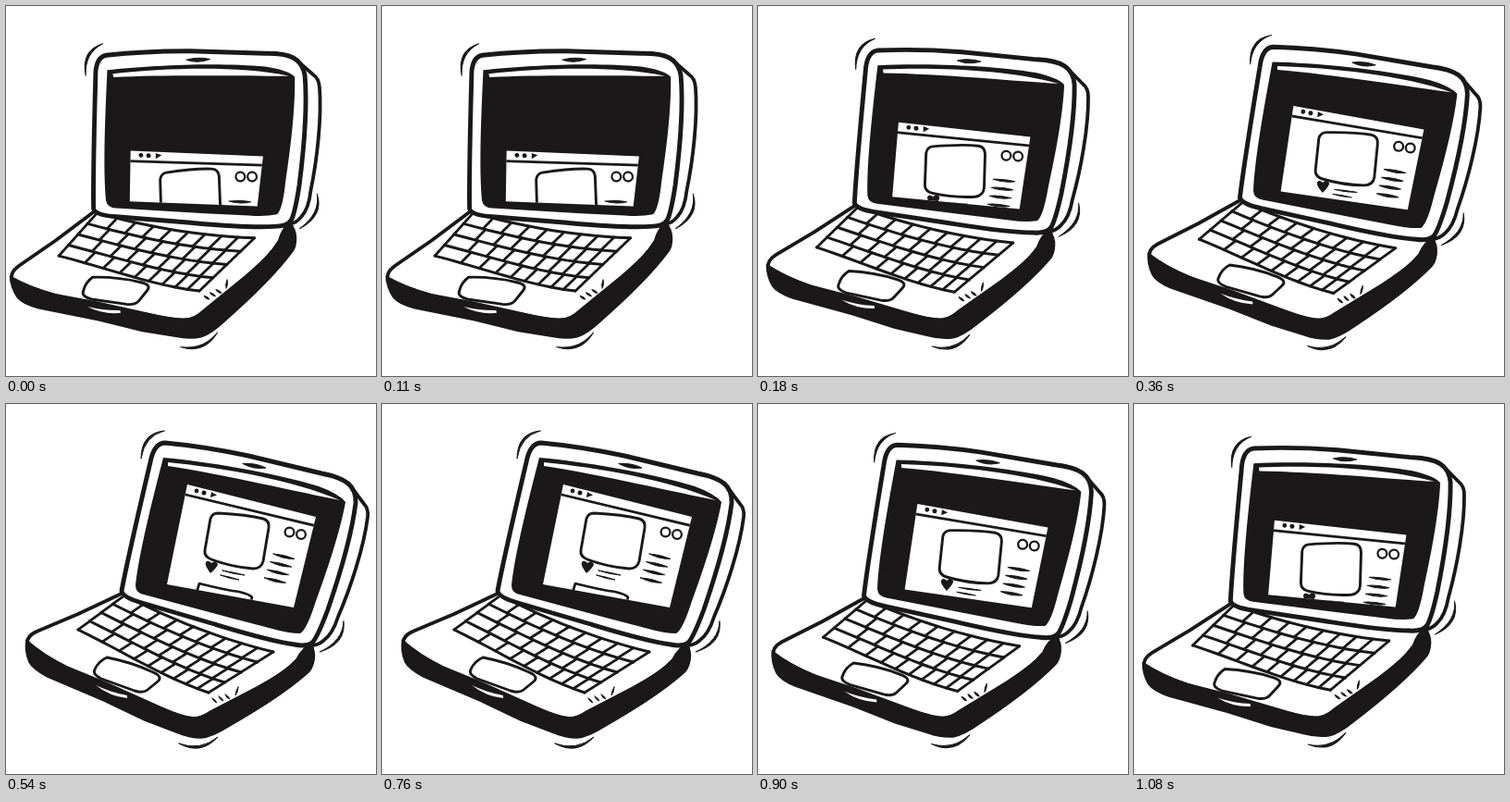
Recreate the animation shown at these times as an HTML page with a canvas. Size 400 by 400 pixels, loop 1.26 s.

```html
<!DOCTYPE html>
<html lang="en">
<head>
<meta charset="utf-8">
<title>Laptop</title>
<style>
html, body { margin: 0; width: 100%; height: 100%; overflow: hidden; background: #fff; }
canvas { display: block; width: 400px; height: 400px; }
</style>
</head>
<body>
<canvas id="stage" width="400" height="400"></canvas>
<script>
const ctx = document.getElementById('stage').getContext('2d');
const INK = '#1a1819', PAPER = '#fff';
const STEP = 180;
const ORDER = [0, 1, 2, 3, 3, 2, 1];
const TILT = 11.7 * Math.PI / 180;
const PIVOT = [195, 359];

// Per pose: page offset inside the screen, and how far its lower edge drops.
const POSES = [
  { dx: -19, dy: 61.5, drop: 1 },
  { dx: -12, dy: 35, drop: 0.85 },
  { dx: -6.5, dy: 20, drop: 0.5 },
  { dx: 0, dy: 0, drop: 0 }
];

const shape = d => new Path2D(d);
const LID = shape('M125 202C132 165 145 110 156 63Q160 42 172 42Q215 46 262 56L341 75C367 80 379 88 378 107C374 140 359 190 348 222Q338 249 332 257Q326 263 312 260C284 256 252 246 222 237L147 215Q126 209 125 202Z');
const LID_BACK = shape('M341 75C361 78 370 86 378 96L387 108Q392 113 391 122C387 155 372 200 359 230Q353 249 343 256Q337 261 330 261');
const SCREEN = shape('M170 58C215 62 290 74 338 89Q360 97 367 106C361 140 345 186 334 216Q325 244 318 248Q305 248 288 243L242 231L149 206Q140 204 140 196C144 160 158 105 170 58Z');
const GLARE = shape('M175 63C235 69 310 82 361 104C320 96 235 76 175 67Z');
const DECK = shape('M127 204L78 227L33 246Q22 251 23 260Q60 286 110 304Q160 328 190 338Q205 344 220 334L272 307Q315 283 331 264Z');
const FRONT = shape('M22 255Q40 271 66 284L110 302L168 328Q190 338 203 339Q212 339 224 331L272 306Q300 291 314 276Q320 264 329 260Q335 266 333 277Q331 287 326 291C300 314 270 332 240 349Q222 360 211 361Q198 361 184 355L150 342L106 321L45 295Q29 287 25 279Q20 267 22 255Z');
const NOTCH = shape('M97 304Q114 312 131 315L131 318Q112 316 97 304Z');
const PAD = shape('M109 274Q136 279 159 290Q170 295 164 300L153 309Q148 313 139 310L103 297Q93 292 96 287Q100 278 109 274Z');
const PICTURE = shape('M229 118C248 119 266 121 278 124Q285 126 284 134L278 170Q276 178 267 178Q243 176 222 168Q214 165 215 158L221 124Q223 118 229 118Z');
const HEART = shape('M221 183C217 177 215 174 216 171Q219 168 222 172Q226 168 229 173Q229 176 221 183Z');
const TAB = shape('M206 204L209 194Q236 201 252 203Q264 206 266 209L264 216');

function fill(path, color = INK) {
  ctx.fillStyle = color;
  ctx.fill(path);
}

function stroke(path, width) {
  ctx.lineWidth = width;
  ctx.stroke(path);
}

function line(x1, y1, x2, y2, width) {
  ctx.lineWidth = width;
  ctx.beginPath();
  ctx.moveTo(x1, y1);
  ctx.lineTo(x2, y2);
  ctx.stroke();
}

function dot(x, y, r) {
  ctx.beginPath();
  ctx.arc(x, y, r, 0, 7);
}

// Brush mark that is thick in the middle and pointed at both ends.
function brush(x1, y1, cx, cy, x2, y2, width) {
  const len = Math.hypot(x2 - x1, y2 - y1);
  const nx = -(y2 - y1) / len * width, ny = (x2 - x1) / len * width;
  ctx.fillStyle = INK;
  ctx.lineWidth = 1;
  ctx.beginPath();
  ctx.moveTo(x1, y1);
  ctx.quadraticCurveTo(cx + nx, cy + ny, x2, y2);
  ctx.quadraticCurveTo(cx - nx, cy - ny, x1, y1);
  ctx.fill();
  ctx.stroke();
}

function dash(x, y, w, h, width) {
  brush(x, y, x + w / 2, y + h / 2 + 0.5, x + w, y + h, width);
}

// Point on the keyboard, u across and v towards the user.
function key(u, v) {
  const mix = (a, b, c, d) => (a + (b - a) * u) * (1 - v) + (d + (c - d) * u) * v;
  const sag = u * (1 - u) * (22 * (1 - v) + 22 * u * v);
  return [mix(128, 289, 219, 78), mix(207, 268, 312, 244) + sag];
}

function keyLine(u1, v1, u2, v2, width) {
  ctx.lineWidth = width;
  ctx.beginPath();
  for (let i = 0; i <= 12; i++) {
    const t = i / 12;
    ctx.lineTo(...key(u1 + (u2 - u1) * t, v1 + (v2 - v1) * t));
  }
  ctx.stroke();
}

function keyboard() {
  const rows = 4, cols = 9;
  for (let r = 0; r <= rows; r++) keyLine(0, r / rows, 1, r / rows, 3);
  for (let r = 0; r < rows; r++) {
    for (let c = 0; c <= cols; c++) {
      const u = (c / cols) ** (0.95 - 0.06 * r);
      keyLine(u, r / rows, u, (r + 1) / rows, 2.8);
    }
  }
}

function page({ dx, dy, drop }) {
  ctx.save();
  ctx.beginPath();
  ctx.moveTo(196 + dx, 87 + dy);
  ctx.lineTo(335 + dx, 122 + dy);
  ctx.lineTo(311 - 12 * drop, 220 + 15 * drop);
  ctx.lineTo(174 - 9 * drop, 195 + 7 * drop);
  ctx.closePath();
  ctx.fillStyle = PAPER;
  ctx.fill();
  ctx.clip();
  ctx.translate(dx, dy);

  line(190, 97, 336, 132, 2.8);
  ctx.fillStyle = INK;
  dot(206, 94, 2.4);
  ctx.fill();
  dot(214, 96, 2.5);
  ctx.fill();
  fill(shape('M222 95L228 98.5L221 101Z'));

  stroke(PICTURE, 2.9);
  for (const [x, y] of [[306.5, 138.5], [319, 141]]) {
    dot(x, y, 4.9);
    ctx.lineWidth = 2.3;
    ctx.stroke();
  }
  for (let i = 0; i < 4; i++) dash(289 - 3.2 * i, 162 + 8.6 * i, 23, 5.5, 2.6);
  fill(HEART);
  dash(234, 180, 24, 5, 1.2);
  dash(232, 185, 20, 5, 1.2);
  stroke(TAB, 2.7);
  ctx.restore();
}

function laptop(pose) {
  fill(DECK, PAPER);
  stroke(DECK, 3.8);
  fill(FRONT);
  stroke(FRONT, 1.5);
  fill(NOTCH, PAPER);
  keyboard();
  stroke(PAD, 2.9);
  for (let i = 0; i < 3; i++) dash(223 + 7 * i, 318 - 2 * i, 5, 5, 1.7);
  dash(251, 306, -3, 9, 1.5);

  stroke(LID_BACK, 3.8);
  fill(LID, PAPER);
  stroke(LID, 4.9);
  fill(SCREEN);
  fill(GLARE, PAPER);
  dash(256, 64.5, 25, 4.5, 4);
  page(pose);

  brush(171, 29, 148, 33, 146, 59, 2.4);
  brush(365, 235, 366, 258, 339, 268, 2.4);
  brush(187, 367, 210, 378, 229, 360, 2.4);
}

function draw(now) {
  const n = ORDER[Math.floor(now / STEP) % ORDER.length];
  ctx.setTransform(1, 0, 0, 1, 0, 0);
  ctx.fillStyle = PAPER;
  ctx.fillRect(0, 0, 400, 400);
  ctx.strokeStyle = INK;
  ctx.lineCap = ctx.lineJoin = 'round';
  ctx.translate(...PIVOT);
  ctx.rotate(TILT * (n - 3) / 3);
  ctx.translate(-PIVOT[0], -PIVOT[1]);
  laptop(POSES[n]);
}

const start = performance.now();
function tick() {
  draw(performance.now() - start);
  requestAnimationFrame(tick);
}
tick();
</script>
</body>
</html>
```
